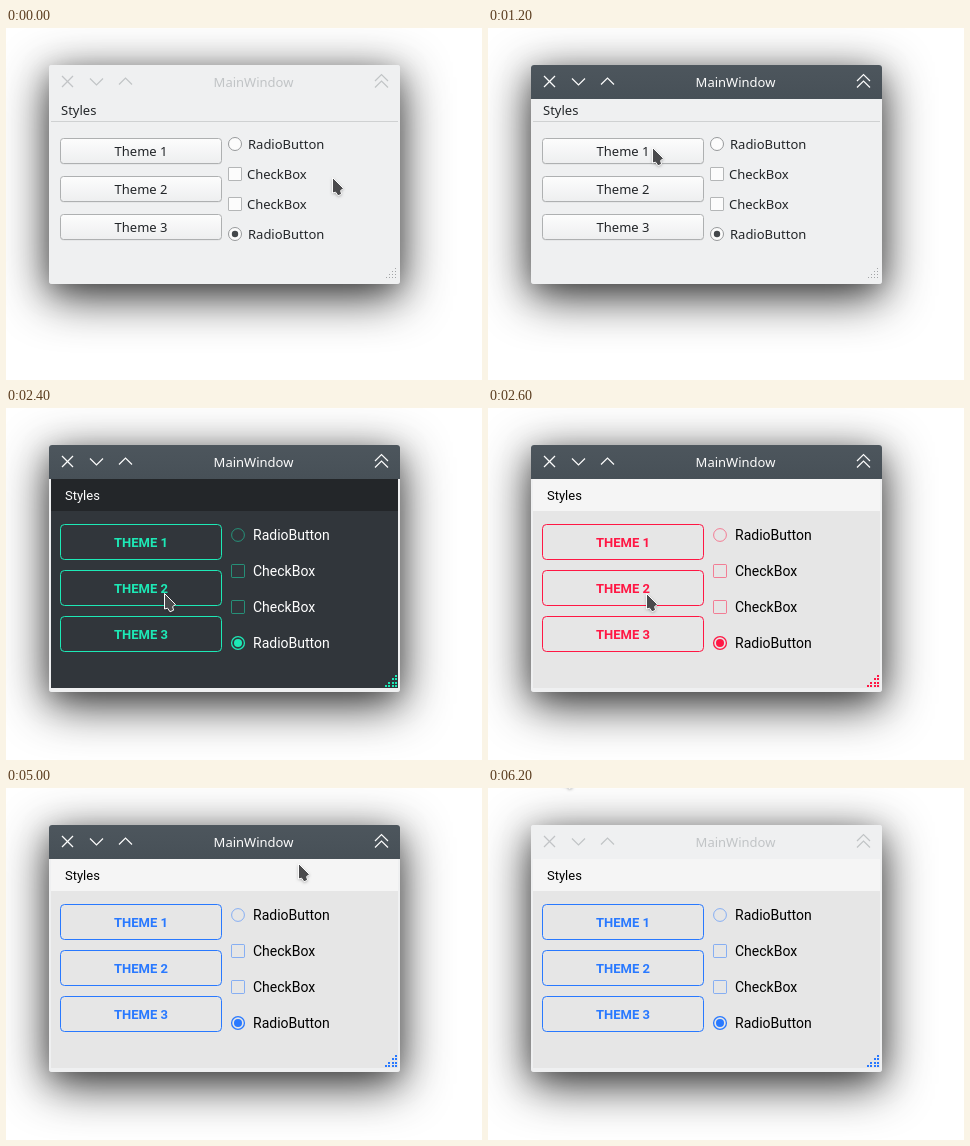
An HTML page with a canvas that plays this animation: 476x352 px, repeating every 6400 ms.

```html
<!DOCTYPE html>
<html lang="en">
<head>
<meta charset="utf-8">
<title>Theme switcher</title>
<style>
html, body { margin: 0; width: 100%; height: 100%; overflow: hidden; background: #fff; }
canvas { display: block; }
</style>
</head>
<body>
<canvas id="stage" width="476" height="352"></canvas>
<script>
const ctx = document.getElementById('stage').getContext('2d');
const LOOP = 6400, STEP = 100;
const NOTO = '"Noto Sans", sans-serif', ROBOTO = 'Roboto, sans-serif';
const OPTIONS = ['RadioButton', 'CheckBox', 'CheckBox', 'RadioButton'];

const THEMES = {
  teal: { bar: '#232629', body: '#31363b', text: '#ffffff', accent: '#1de9b6' },
  red: { bar: '#f5f5f5', body: '#e6e6e6', text: '#000000', accent: '#ff1744' },
  blue: { bar: '#f5f5f5', body: '#e6e6e6', text: '#000000', accent: '#2979ff' }
};

// Pointer path: [time, x, y]
const PATH = [
  [0, 326, 149], [300, 326, 149], [900, 164, 119],
  [1800, 164, 119], [2200, 158, 185],
  [3000, 158, 185], [3500, 163, 231],
  [4600, 163, 231], [4700, 190, 244], [4800, 285, 212], [4900, 325, 140],
  [5000, 292, 75], [5100, 234, 34], [5200, 176, 9], [5300, 132, -2],
  [5900, 75, -18], [LOOP, 75, -18]
];

const clamp = v => Math.min(1, Math.max(0, v));
const smooth = v => v * v * (3 - 2 * v);

function pointerAt(t) {
  const i = PATH.findIndex(p => p[0] > t);
  const [t0, x0, y0] = PATH[i - 1], [t1, x1, y1] = PATH[i];
  const k = smooth((t - t0) / (t1 - t0));
  return [Math.round(x0 + (x1 - x0) * k), Math.round(y0 + (y1 - y0) * k)];
}

function themeAt(t) {
  if (t < 1400) return null;
  return t < 2600 ? THEMES.teal : t < 4000 ? THEMES.red : THEMES.blue;
}

function pressedAt(t) {
  return t === 2300 ? 1 : t === 3700 ? 2 : -1;
}

function activeLevel(t) {
  return t < 5000 ? clamp((t - 1000) / 200) : clamp((6200 - t) / 200);
}

function text(str, x, y, font, color, align = 'left') {
  ctx.font = font;
  ctx.fillStyle = color;
  ctx.textAlign = align;
  ctx.fillText(str, x, y);
}

function box(x, y, w, h, r, fill, stroke) {
  ctx.beginPath();
  ctx.roundRect(x, y, w, h, r);
  if (fill) { ctx.fillStyle = fill; ctx.fill(); }
  if (stroke) { ctx.strokeStyle = stroke; ctx.lineWidth = 1; ctx.stroke(); }
}

function disc(x, y, r, fill, stroke, width = 1) {
  ctx.beginPath();
  ctx.arc(x, y, r, 0, 2 * Math.PI);
  if (fill) { ctx.fillStyle = fill; ctx.fill(); }
  if (stroke) { ctx.strokeStyle = stroke; ctx.lineWidth = width; ctx.stroke(); }
}

function polyline(...pts) {
  ctx.beginPath();
  pts.forEach(([x, y]) => ctx.lineTo(x, y));
  ctx.stroke();
}

function vertical(y0, y1, top, bottom) {
  const g = ctx.createLinearGradient(0, y0, 0, y1);
  g.addColorStop(0, top);
  g.addColorStop(1, bottom);
  return g;
}

function grip(x, y, step, size, color) {
  ctx.fillStyle = color;
  for (let row = 0; row < 4; row++)
    for (let col = 3 - row; col < 4; col++)
      ctx.fillRect(Math.round(x + col * step), Math.round(y + row * step), size, size);
}

function windowFrame(bottom) {
  for (const [dy, blur, alpha] of [[12, 48, 0.8], [6, 24, 0.2]]) {
    ctx.save();
    ctx.shadowColor = `rgba(0,0,0,${alpha})`;
    ctx.shadowBlur = blur;
    ctx.shadowOffsetY = dy;
    box(43, 37, 351, bottom - 37, 3, '#eff0f1');
    ctx.restore();
  }
}

function titleBar(fill, color) {
  box(43, 37, 351, 34, [3, 3, 0, 0], fill);
  ctx.strokeStyle = color;
  ctx.lineWidth = 1.2;
  polyline([56, 48], [67, 59]);
  polyline([67, 48], [56, 59]);
  polyline([84, 50.5], [90.5, 57], [97, 50.5]);
  polyline([113, 56.5], [119.5, 50], [126, 56.5]);
  polyline([369, 53], [375.5, 46.5], [382, 53]);
  polyline([369, 59.5], [375.5, 53], [382, 59.5]);
  text('MainWindow', 247.5, 59, `13px ${NOTO}`, color, 'center');
}

function plainBody() {
  const font = `13px ${NOTO}`, ink = '#232629';
  text('Styles', 55, 87, font, ink);
  ctx.fillStyle = '#cfd1d2';
  ctx.fillRect(45, 93, 347, 1);
  for (let i = 0; i < 3; i++) {
    const y = 110 + 38 * i;
    box(54.5, y + 1.5, 161, 25, 3, 'rgba(0,0,0,0.08)');
    box(54.5, y + 0.5, 161, 25, 3, vertical(y, y + 26, '#fdfdfd', '#edeeef'), '#aeb0b1');
    text(`Theme ${i + 1}`, 135, y + 18, font, ink, 'center');
  }
  OPTIONS.forEach((label, i) => {
    const y = 116 + 30 * i, radio = label === 'RadioButton';
    if (radio) disc(229, y, 6.5, '#fcfcfc', '#97999b');
    else box(222.5, y - 6.5, 13, 13, 0.5, '#fcfcfc', '#b4b6b7');
    if (i === 3) disc(229, y, 3.2, '#44484b');
    text(label, radio ? 242 : 241, y + 5, font, ink);
  });
  grip(380, 240, 3, 1, '#a2a4a6');
}

function themedBody(theme, pressed) {
  ctx.fillStyle = theme.body;
  ctx.fillRect(45, 71, 347, 209);
  ctx.fillStyle = theme.bar;
  ctx.fillRect(45, 71, 347, 32);
  text('Styles', 59, 92, `13px ${ROBOTO}`, theme.text);
  for (let i = 0; i < 3; i++) {
    const y = 116 + 46 * i, down = i === pressed;
    box(54.5, y + 0.5, 161, 35, 4, down && theme.accent, theme.accent);
    text(`THEME ${i + 1}`, 135, y + 23, `bold 13px ${ROBOTO}`, down ? theme.bar : theme.accent, 'center');
  }
  OPTIONS.forEach((label, i) => {
    const y = 127 + 36 * i;
    ctx.globalAlpha = i === 3 ? 1 : 0.5;
    if (label === 'RadioButton') disc(232, y, 6.4, null, theme.accent, i === 3 ? 1.3 : 1);
    else box(225.5, y - 6.5, 13, 13, 1, null, theme.accent);
    ctx.globalAlpha = 1;
    if (i === 3) disc(232, y, 4, theme.accent);
    text(label, 247, y + 5, `14px ${ROBOTO}`, theme.text);
  });
  grip(379, 267, 3.4, 2, theme.accent);
}

function pointer(x, y) {
  ctx.save();
  ctx.translate(x, y);
  ctx.beginPath();
  [[0.5, 0.5], [0.5, 16], [3.6, 15.2], [6, 18.8], [9.6, 17.2], [8.6, 13.6], [11.5, 11.5]]
    .forEach(([px, py]) => ctx.lineTo(px, py));
  ctx.closePath();
  ctx.lineJoin = 'round';
  ctx.lineWidth = 1;
  ctx.strokeStyle = '#fcfcfc';
  ctx.fillStyle = '#4a4a4c';
  ctx.shadowColor = 'rgba(0,0,0,0.35)';
  ctx.shadowBlur = 3;
  ctx.shadowOffsetY = 1;
  ctx.fill();
  ctx.shadowColor = 'transparent';
  ctx.stroke();
  ctx.restore();
}

function draw(t) {
  const theme = themeAt(t);
  ctx.fillStyle = '#fff';
  ctx.fillRect(0, 0, 476, 352);
  windowFrame(theme ? 284 : 256);
  titleBar('#eff0f1', '#c1c4c6');
  ctx.globalAlpha = activeLevel(t);
  titleBar(vertical(37, 71, '#4d565d', '#475057'), '#fcfcfc');
  ctx.globalAlpha = 1;
  if (theme) themedBody(theme, pressedAt(t));
  else plainBody();
  pointer(...pointerAt(t));
}

const start = performance.now();
function tick() {
  const t = (performance.now() - start) % LOOP;
  draw(Math.floor(t / STEP) * STEP);
  requestAnimationFrame(tick);
}
tick();
</script>
</body>
</html>
```
